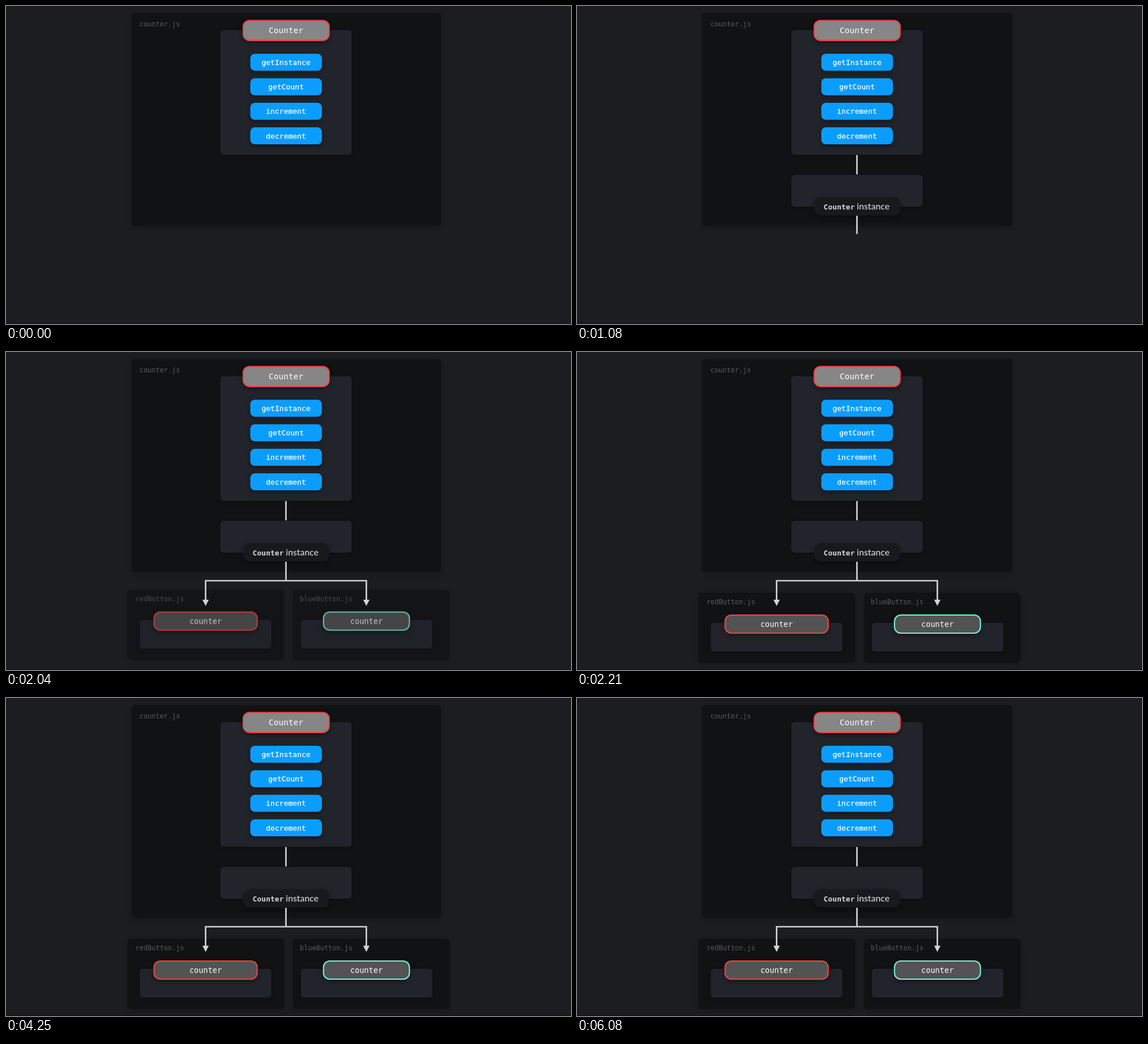
An HTML page that plays this animation: 998x561 px, repeating every 7.29 s.

```html
<!DOCTYPE html>
<html lang="en">
<head>
<meta charset="utf-8">
<title>Singleton counter</title>
<style>
  html, body { margin: 0; width: 100%; height: 100%; overflow: hidden; background: #1c1d21; }
  svg { display: block; width: 998px; height: 561px; }
  text { font-family: "DejaVu Sans Mono", monospace; fill: #fff; }
  .mid { text-anchor: middle; }
  .file { font-size: 11.9px; fill: #5a5b5d; }
  .panel { fill: #111214; filter: drop-shadow(0 3px 4px rgba(0, 0, 0, .22)); }
  .inner { fill: #22242c; filter: drop-shadow(0 2px 3px rgba(0, 0, 0, .25)); }
  .chip { filter: drop-shadow(0 3px 4px rgba(0, 0, 0, .4)); }
  .wire { fill: none; stroke: #d2d2d4; stroke-width: 2.7; stroke-dasharray: 1 2; }
  .head { fill: #d2d2d4; }
</style>
</head>
<body>
<svg viewBox="0 0 998 561" xmlns="http://www.w3.org/2000/svg"></svg>
<script>
const LOOP = 7290;
const EASE = 'cubic-bezier(.37, 0, .63, 1)';
const svg = document.querySelector('svg');

function add(parent, tag, attrs = {}, text = '') {
  const el = document.createElementNS(svg.namespaceURI, tag);
  for (const key in attrs) el.setAttribute(key, attrs[key]);
  el.textContent = text;
  parent.append(el);
  return el;
}

const box = (parent, cls, x, y, width, height, rx, more = {}) =>
  add(parent, 'rect', { class: cls, x, y, width, height, rx, ...more });

const label = (parent, text, x, y, size) =>
  add(parent, 'text', { class: 'mid', x, y, 'font-size': size }, text);

const file = (parent, name, x, y) => add(parent, 'text', { class: 'file', x, y }, name);

const wire = d => add(svg, 'path', { class: 'wire', d, pathLength: 1 });

// Holds `from` until start, eases to `to` by end, then holds until the loop restarts.
function tween(el, from, to, start, end) {
  el.animate([
    { ...from, offset: 0 },
    { ...from, offset: start / LOOP, easing: EASE },
    { ...to, offset: end / LOOP },
    { ...to, offset: 1 }
  ], { duration: LOOP, iterations: Infinity });
}

const draw = (el, start, end) =>
  tween(el, { strokeDashoffset: 1 }, { strokeDashoffset: 0 }, start, end);

const drop = (el, start, end) =>
  tween(el, { opacity: 0, transform: 'translate(0px, -22px)' },
            { opacity: 1, transform: 'translate(0px, 0px)' }, start, end);

// Class panel
box(svg, 'panel', 221.5, 12.5, 547, 375.5, 5);
file(svg, 'counter.js', 235.8, 35.7);
box(svg, 'inner', 378.5, 42.5, 232, 220, 6);
box(svg, 'chip', 419, 25.6, 151.8, 35.2, 11, { fill: '#868686', stroke: '#ee4444', 'stroke-width': 2.2 });
label(svg, 'Counter', 494.6, 48.4, 14.5);
['getInstance', 'getCount', 'increment', 'decrement'].forEach((name, i) => {
  const y = 84.2 + i * 43.3;
  box(svg, 'chip', 431.5, y, 126.5, 30, 8, { fill: '#0b9dfd' });
  const t = label(svg, name, 494.6, y + 19.5, 13.05);
  t.setAttribute('stroke', '#fff');
  t.setAttribute('stroke-width', .25);
});

// Instance
const instance = add(svg, 'g');
box(instance, 'inner', 378.5, 298, 232, 56, 6);
box(instance, 'chip', 419, 337.5, 151.8, 32, 11, { fill: '#18191d' });
add(instance, 'text', { x: 435.6, y: 358.6, 'font-size': 13.05, 'font-weight': 700, style: 'fill:#d8d8da' }, 'Counter');
add(instance, 'text', {
  x: 494.3, y: 358.6, 'font-size': 15.8, 'font-weight': 500,
  style: 'fill:#d8d8da;font-family:Lato,sans-serif'
}, 'instance');
drop(instance, 460, 760);

// Button modules
const modules = add(svg, 'g');
[
  { name: 'redButton.js', x: 214.5, inner: 236.5, text: 228.7, cx: 352.6, w: 182.2, color: '#f54242' },
  { name: 'blueButton.js', x: 507, inner: 521, text: 519, cx: 636.7, w: 151.8, color: '#74f7da' }
].forEach(m => {
  box(modules, 'panel', m.x, 424.7, 276.6, 123.6, 6);
  file(modules, m.name, m.text, 445.3);
  box(modules, 'inner', m.inner, 477.8, 232, 50.6, 5);
  box(modules, 'chip', m.cx - m.w / 2, 464, m.w, 32, 11, { fill: '#535353', stroke: m.color, 'stroke-width': 2.1 });
  label(modules, 'counter', m.cx, 484.8, 13.6);
});
drop(modules, 1840, 2140);

// Connectors
draw(wire('M494.5 263V297'), 20, 330);
draw(wire('M494.5 370V403.5'), 820, 1120);
[352.6, 636.5].forEach(x => {
  const tip = x < 494 ? x - 1.3 : x + 1.3;
  draw(wire(`M494.5 403.5H${tip}`), 1130, 1420);
  draw(wire(`M${x} 403.5V438`), 1430, 1730);
  const head = add(svg, 'path', { class: 'head', d: `M${x - 5.6} 437H${x + 5.6}L${x} 448Z` });
  tween(head, { transform: 'translate(0px, -34px)' }, { transform: 'translate(0px, 0px)' }, 1430, 1730);
  tween(head, { opacity: 0 }, { opacity: 1 }, 1430, 1431);
});

box(svg, '', 0, 560, 998, 1, 0, { fill: '#0c0c0e' });
</script>
</body>
</html>
```
